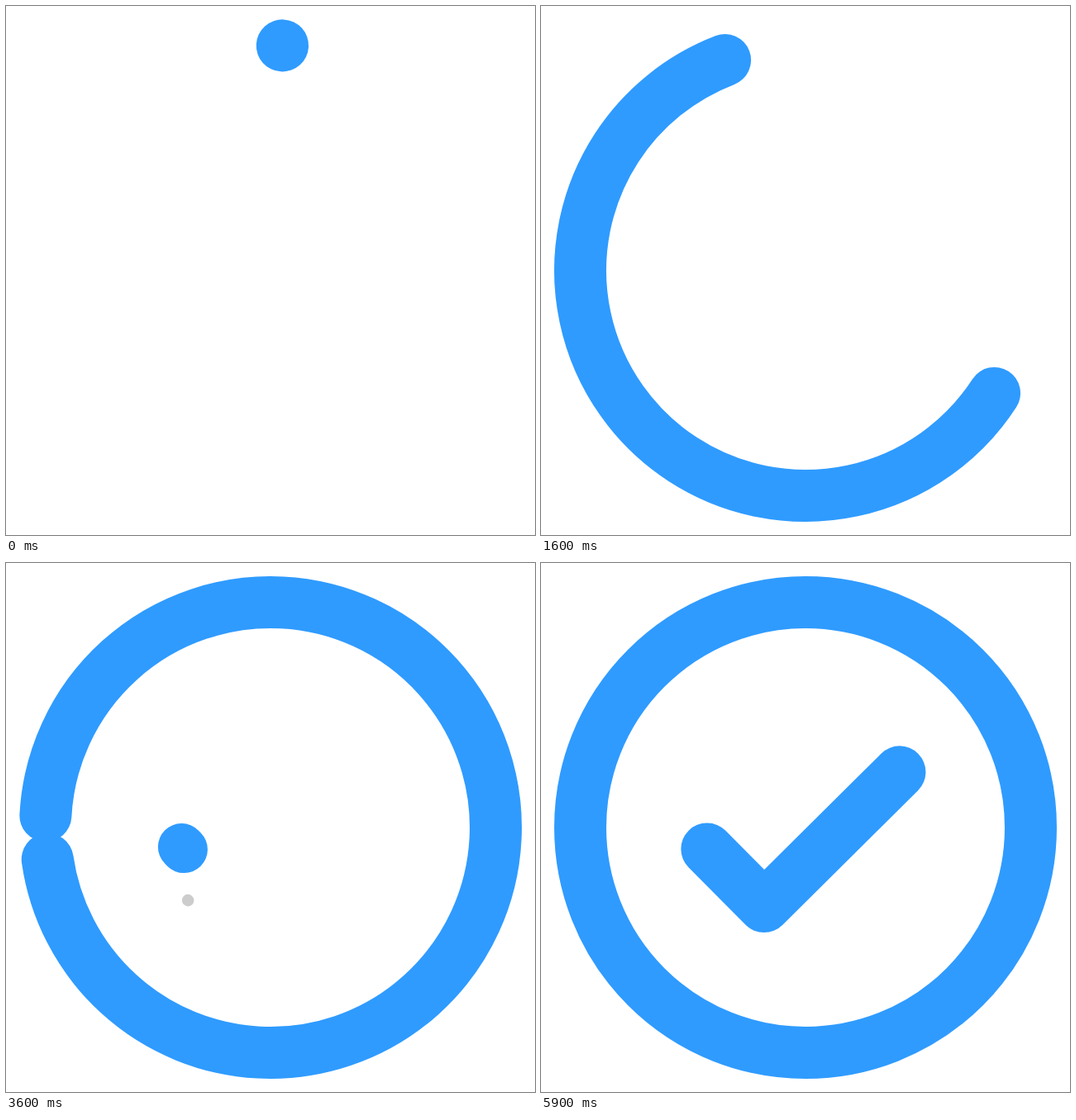
These frames come from a looping animation (640x640 px, 6000 ms). An HTML page:

```html
<!DOCTYPE html>
<html lang="en">
<head>
<meta charset="utf-8">
<title>Check</title>
<style>
  html, body { margin: 0; width: 100%; height: 100%; overflow: hidden; background: #fff; }
  svg { display: block; width: 100vw; height: 100vh; }
  svg * { fill: none; stroke-linecap: round; stroke-linejoin: round; }
  .main { stroke: #2f9bff; stroke-width: 63px; }
  .spark { stroke: #ccc; stroke-width: 15.75px; }
</style>
</head>
<body>
<svg viewBox="-320 -320 640 640">
  <circle id="ring" class="main" r="272.5" pathLength="1"/>
  <g id="mark">
    <path id="spark1" class="spark" pathLength="1" d="M-110.5 97.2L-61.5 146.2"/>
    <path id="spark2" class="spark" pathLength="1" d="M22 93L168 -53"/>
    <path id="tick" class="main" pathLength="1" d="M-118.9 26L-50 95.4L113.8 -67.1"/>
  </g>
</svg>
<script>
  const LOOP = 6000, STEP = 100, FPS = 25;
  const [ring, mark, spark1, spark2, tick] =
    ['ring', 'mark', 'spark1', 'spark2', 'tick'].map(id => document.getElementById(id));

  // Cubic Bezier easing with flat ends: (x1, 0, x2, 1)
  const ease = (x1, x2) => x => {
    if (x <= 0) return 0;
    if (x >= 1) return 1;
    let lo = 0, hi = 1;
    for (let i = 0; i < 30; i++) {
      const u = (lo + hi) / 2, v = 1 - u;
      if (3 * u * v * v * x1 + 3 * u * u * v * x2 + u * u * u < x) lo = u;
      else hi = u;
    }
    return lo * lo * (3 - 2 * lo);
  };
  const soft = ease(0.333, 0.667);
  const rush = ease(0.333, 0.127);
  const span = (f, from, to, fn) => fn((f - from) / (to - from));

  function trim(el, from, to) {
    const shown = to > from;
    el.style.display = shown ? '' : 'none';
    if (!shown) return;
    const whole = to - from >= 1;
    el.setAttribute('stroke-dasharray', whole ? 'none' : `${to - from} 2`);
    el.setAttribute('stroke-dashoffset', whole ? 0 : -from);
  }

  function draw(f) {
    trim(ring, 0, span(f, 0, 120, rush));
    ring.setAttribute('transform', `rotate(${Math.min(f, 120) * 3 - 90})`);

    const scale = 0.9 + 0.18 * span(f, 87, 127, soft) - 0.08 * span(f, 127, 150, soft);
    mark.setAttribute('transform', `scale(${scale})`);
    trim(tick, 0, span(f, 87, 150, rush));
    trim(spark1, span(f, 94, 114, soft), span(f, 90, 110, soft));
    trim(spark2, span(f, 102, 130, soft), span(f, 98, 125, soft));
  }

  // The picture moves ten times a second, on whole 25 fps frames
  const start = performance.now();
  function tickClock() {
    const t = (performance.now() - start + 8) % LOOP;
    const held = Math.floor(t / STEP) * STEP;
    draw(Math.floor(held * FPS / 1000) + 1);
    requestAnimationFrame(tickClock);
  }
  tickClock();
</script>
</body>
</html>
```
